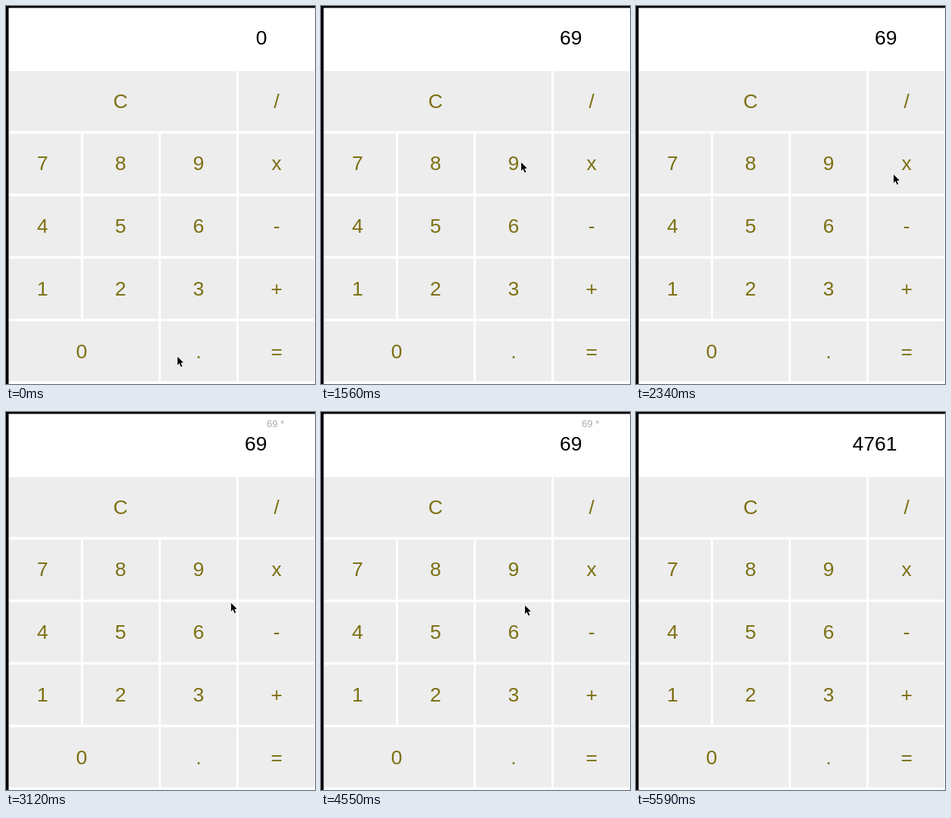
An HTML page with a canvas that plays this animation: 409 by 500 pixels, repeating every 6760 ms.

```html
<!DOCTYPE html>
<html lang="en">
<head>
<meta charset="utf-8">
<title>Calculator</title>
<style>
  html, body { margin: 0; height: 100%; overflow: hidden; background: #fff; }
  canvas { display: block; }
</style>
</head>
<body>
<canvas id="stage" width="409" height="500"></canvas>
<script>
const ctx = document.getElementById('stage').getContext('2d');
const LOOP = 6760, STEP = 130;
const FONT = '"Liberation Sans", Arial, sans-serif';

// Each character is one cell; repeated characters form a wide key
const layout = ['CCC/', '789x', '456-', '123+', '00.='];
const PITCH_X = 103.25, PITCH_Y = 82.75, KEY_WIDTH = 100.25, KEY_HEIGHT = 79.5;

// The pointer rests on a key, presses it and sets off for the next one
const REST = 2 * STEP;
const start = { time: 0, x: 227, y: 464 };
const presses = [
  { time: 1040, key: '6', x: 266, y: 298 },
  { time: 1560, key: '9', x: 265, y: 207 },
  { time: 2600, key: 'x', x: 341, y: 223 },
  { time: 3770, key: '6', x: 270, y: 272 },
  { time: 4550, key: '9', x: 270, y: 256 },
  { time: 5200, key: '=', x: 366, y: 462 }
];
const POINTER_LEAVES = 5590;
const arrow = new Path2D('M0 0V11L2.5 8.6L4.5 13.3L6.3 12.5L4.3 8L7.8 7.7Z');

function calculate(time) {
  let value = '0', left = null, fresh = true;
  for (const { key } of presses.filter(press => press.time <= time)) {
    if (key === 'x') {
      left = value;
    } else if (key === '=') {
      value = String(left * value);
      left = null;
    } else {
      value = fresh ? key : value + key;
    }
    fresh = key === 'x' || key === '=';
  }
  return { value, pending: left ? `${left} *` : '' };
}

function write(text, x, y, size, color, align) {
  ctx.font = `${size}px ${FONT}`;
  ctx.fillStyle = color;
  ctx.textAlign = align;
  ctx.fillText(text, x, y);
}

function drawKeys() {
  layout.forEach((labels, row) => {
    const top = 86 + row * PITCH_Y;
    for (const label of new Set(labels)) {
      const first = labels.indexOf(label), last = labels.lastIndexOf(label);
      const x = first * PITCH_X - 1.75;
      const width = (last - first) * PITCH_X + KEY_WIDTH;
      const left = Math.max(4, Math.round(x)), right = Math.round(x + width);
      ctx.fillStyle = '#ededed';
      ctx.fillRect(left, top, right - left, KEY_HEIGHT);
      write(label, x + width / 2, Math.floor(top + 49), 26.5, '#7c7012', 'center');
    }
  });
}

function drawPointer(time) {
  if (time >= POINTER_LEAVES) return;
  const to = presses.find(press => press.time > time) ?? presses.at(-1);
  const from = presses[presses.indexOf(to) - 1] ?? start;
  const p = Math.min(1, (time - from.time) / (to.time - REST - from.time));
  const eased = p * p * (3 - 2 * p);
  ctx.save();
  ctx.translate(from.x + (to.x - from.x) * eased, from.y + (to.y - from.y) * eased);
  ctx.strokeStyle = 'rgba(255, 255, 255, .75)';
  ctx.stroke(arrow);
  ctx.fillStyle = '#000';
  ctx.fill(arrow);
  ctx.restore();
}

function draw() {
  const time = Math.floor(performance.now() % LOOP / STEP) * STEP;
  ctx.fillStyle = '#000';
  ctx.fillRect(0, 0, 409, 500);
  ctx.fillStyle = '#fff';
  ctx.fillRect(3.5, 2.5, 406, 498);
  drawKeys();

  const { value, pending } = calculate(time);
  write(value, 345.5, 51, 26.5, '#000', 'right');
  write(pending, 345, 19.5, 13.2, '#aaa', 'left');
  drawPointer(time);
  requestAnimationFrame(draw);
}
draw();
</script>
</body>
</html>
```
